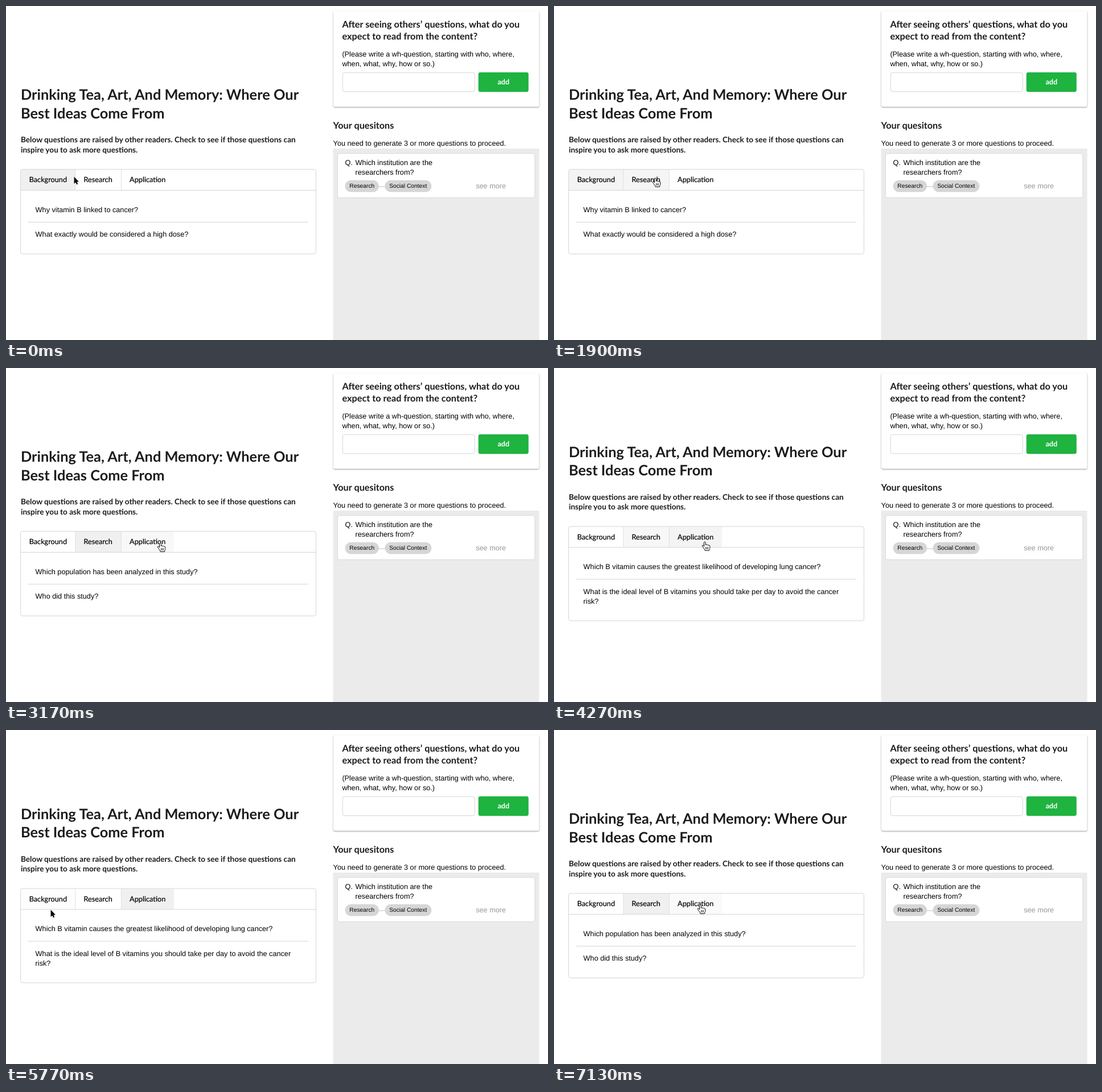
Animation, 952 px wide and 588 px high, one loop 7.16 s. Source, as an HTML page:

```html
<!DOCTYPE html>
<html lang="en">
<head>
<meta charset="utf-8">
<title>Reader questions</title>
<style>
html, body { margin: 0; width: 100%; height: 100%; overflow: hidden; background: #fff; }
svg { display: block; width: 952px; height: 588px; }
text { font: 12.69px "Liberation Sans", Arial, sans-serif; fill: #000; text-rendering: geometricPrecision; }
.h1, .h3, .h4, .add, .label { font-family: Lato, sans-serif; }
.h1, .h3, .h4, .add { font-weight: 700; fill: #1b1c1d; }
.h1 { font-size: 25.39px; }
.h3 { font-size: 16.25px; }
.h4 { font-size: 13.6px; }
.label { stroke: #000; stroke-width: .2px; }
.tag { font-size: 10.25px; }
.tag, .add { text-anchor: middle; }
.line { fill: none; stroke: #d4d4d5; }
.card { fill: #fff; filter: drop-shadow(0 1px 1.3px rgba(0, 0, 0, .42)); }
</style>
</head>
<body>
<svg viewBox="0 0 952 588">
  <clipPath id="inside"><rect x="26" y="288" width="518" height="148" rx="3.2"/></clipPath>
  <g id="left">
    <text class="h1" x="26" y="165.2">Drinking Tea, Art, And Memory: Where Our</text>
    <text class="h1" x="26" y="197.8">Best Ideas Come From</text>
    <text class="h4" x="26" y="240.3">Below questions are raised by other readers. Check to see if those questions can</text>
    <text class="h4" x="26" y="257.7">inspire you to ask more questions.</text>
    <g id="tabs" clip-path="url(#inside)"></g>
    <path class="line" d="M26 324.4H544M39 380.5H531"/>
    <rect id="box" class="line" x="25.6" y="287.6" width="518.8" rx="3.6"/>
    <text class="question" x="51.6" y="362.8"></text>
    <text class="question" x="51.6" y="406.2"></text>
    <text class="question" x="51.6" y="423.5"></text>
  </g>

  <rect class="card" x="575" y="9" width="361.5" height="168.5" rx="3"/>
  <text class="h3" x="590.5" y="38">After seeing others’ questions, what do you</text>
  <text class="h3" x="590.5" y="58.8">expect to read from the content?</text>
  <text x="590.4" y="88.7">(Please write a wh-question, starting with who, where,</text>
  <text x="590.4" y="106">when, what, why, how or so.)</text>
  <rect class="line" x="591.2" y="117.2" width="232" height="33.6" rx="3.6"/>
  <rect x="829.7" y="116.7" width="88.1" height="34.5" rx="3.4" fill="#1fb340"/>
  <text class="add" x="873.8" y="138.3" style="fill:#fff">add</text>

  <text class="h3" x="574.6" y="216.2">Your quesitons</text>
  <text x="574.6" y="246.2">You need to generate 3 or more questions to proceed.</text>
  <rect x="574.6" y="251" width="362" height="337" fill="#ebebeb"/>
  <rect x="582.5" y="259.6" width="346.4" height="78" rx="3.5" fill="#fff" stroke="#d8d8d8"/>
  <text x="595.6" y="279.6">Q.</text>
  <text x="613.6" y="279.6">Which institution are the</text>
  <text x="613.6" y="297">researchers from?</text>
  <g fill="#d6d6d6">
    <rect x="654" y="317.2" width="13" height="1.6"/>
    <rect x="595.5" y="306.8" width="59.5" height="20.6" rx="10.3"/>
    <rect x="665.5" y="306.8" width="82" height="20.6" rx="10.3"/>
  </g>
  <text class="tag" x="625.3" y="320.4">Research</text>
  <text class="tag" x="706.2" y="320.4">Social Context</text>
  <text x="825.2" y="321.2" style="fill:#999">see more</text>

  <g id="cursor">
    <path id="arrow" d="M.6 .6V12.9L3.3 10.4L5.1 14.3L7.2 13.4L5.5 9.6H9Z" stroke="#fff" paint-order="stroke"/>
    <g id="hand" stroke="#000" stroke-linejoin="round" stroke-linecap="round">
      <path fill="#fff" d="M-1.6 1.2C-1.6-.4 1.3-.4 1.3 1.2V5.5C1.6 4.4 4 4.4 4.1 6C4.5 5 6.6 5.2 6.7 6.6C7.2 5.8 8.8 6 8.8 7.6V10.5C8.8 12 7.6 13 7.4 15.3H.2C0 13.5-2 11.5-3 9.8C-4.8 7.6-5 6.8-4.4 6.2C-3.4 5.5-2.4 6.5-1.6 7.8Z"/>
      <path fill="none" stroke-width=".8" d="M1.5 9.4V12.8M3.5 9.4V12.8M5.5 9.4V12.8"/>
    </g>
  </g>
</svg>
<script>
const LOOP = 7160, FADE = 100, STEP = 5, LAG = 40;
const HOVER = .03, ACTIVE = .06;
const TOP = 288, BOTTOM = 324, EXTRA = 8.6;
const $ = id => document.getElementById(id);

const tabs = [
  { name: 'Background', x: 26, end: 121.8,
    questions: ['Why vitamin B linked to cancer?', 'What exactly would be considered a high dose?'] },
  { name: 'Research', x: 121.8, end: 202.4,
    questions: ['Which population has been analyzed in this study?', 'Who did this study?'] },
  { name: 'Application', x: 202.4, end: 295,
    questions: ['Which B vitamin causes the greatest likelihood of developing lung cancer?',
      'What is the ideal level of B vitamins you should take per day to avoid the cancer', 'risk?'] }
];

const clicks = [
  { at: 1875, tab: 1 }, { at: 4225, tab: 2 }, { at: 6115, tab: 0 }, { at: 6780, tab: 1 }
];

// pointer moves: start, duration, destination
const home = [119, 300];
const moves = [
  [0, 130, 108, 300], [300, 330, 78, 307], [970, 700, 178, 303], [1900, 330, 168, 304],
  [2500, 560, 194, 307], [3060, 110, 271, 308], [3230, 170, 265, 306], [4770, 700, 258, 312],
  [5470, 300, 78, 316], [5770, 330, 69, 300], [6230, 700, 141, 309], [7000, 130, 257, 308]
];

$('tabs').innerHTML = tabs.map(({ name, x, end }) => `
  <rect class="tab" x="${x}" y="${TOP}" width="${end - x}" height="${BOTTOM - TOP}"/>
  ${x > 26 ? `<path d="M${x} ${TOP}V${BOTTOM}" stroke="#e0e0e0"/>` : ''}
  <text class="label" x="${x + 14.7}" y="310.3">${name}</text>`).join('');
const fills = document.querySelectorAll('.tab');
const lines = document.querySelectorAll('.question');

const smooth = u => u * u * (3 - 2 * u);

function pointer(t) {
  let [x, y] = home;
  for (const [start, length, toX, toY] of moves) {
    const u = smooth(Math.min(1, Math.max(0, (t - start) / length)));
    x += (toX - x) * u;
    y += (toY - y) * u;
  }
  return [x, y];
}

const activeTab = t => clicks.reduce((tab, c) => t >= c.at ? c.tab : tab, 0);
const openPage = t => activeTab(t - LAG);
// a third text line grows the centred column both ways
const growth = page => tabs[page].questions.length > 2 ? EXTRA : 0;

function hovered(t) {
  const [x, y] = pointer(t), localY = y + growth(openPage(t));
  return localY < TOP || localY > BOTTOM ? -1 : tabs.findIndex(tab => x >= tab.x && x < tab.end);
}

// averaging the recent states gives each tab its short fade
function shades(t) {
  const sums = tabs.map(() => 0), count = FADE / STEP;
  for (let k = 0; k < count; k++) {
    const past = t - k * STEP, active = activeTab(past), hover = hovered(past);
    tabs.forEach((_, i) => {
      sums[i] += (i === active ? ACTIVE : i === hover ? HOVER : 0) / count;
    });
  }
  return sums;
}

function showPage(page) {
  lines.forEach((line, i) => { line.textContent = tabs[page].questions[i] || ''; });
  $('left').setAttribute('transform', `translate(0 ${-growth(page)})`);
  $('box').setAttribute('height', 148.8 + 2 * growth(page));
}

function draw(t) {
  showPage(openPage(t));
  shades(t).forEach((shade, i) => fills[i].setAttribute('fill-opacity', shade));
  const over = hovered(t);
  const hand = over >= 0 && over !== openPage(t - 10);
  $('cursor').setAttribute('transform', `translate(${pointer(t)})`);
  $('hand').style.display = hand ? '' : 'none';
  $('arrow').style.display = hand ? 'none' : '';
}

const start = performance.now();
function tick() {
  draw((performance.now() - start) % LOOP);
  requestAnimationFrame(tick);
}
tick();
</script>
</body>
</html>
```
